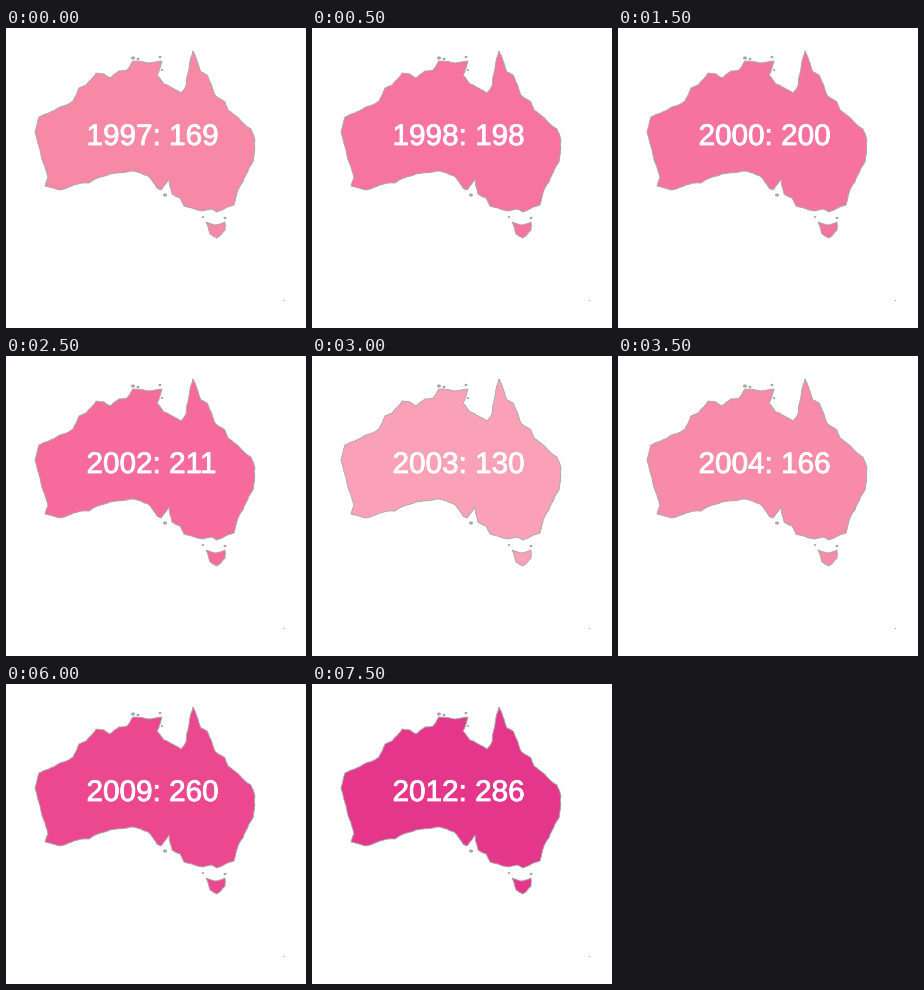
These frames come from a looping animation (300 px wide and 300 px high, 8 s). A matplotlib script:

```python
import numpy as np
import matplotlib.pyplot as plt
from matplotlib.animation import FuncAnimation
from matplotlib.colors import LinearSegmentedColormap, Normalize
from matplotlib.patches import Ellipse, Polygon
from matplotlib.patheffects import withStroke

SIZE, DPI = 300, 100
PT = 72 / DPI
GREY = "#a8a8a8"

FIRST_YEAR = 1997
COUNTS = [169, 198, 323, 200, 218, 211, 130, 166,
          225, 267, 266, 245, 260, 261, 281, 286]

pinks = LinearSegmentedColormap.from_list(
    "pinks", ["#fbaabe", "#f78aa8", "#f66599", "#ea418e", "#d71f87"])
scale = Normalize(115, 323, clip=True)

# Key points clockwise from the northern cape; rough() adds the coastal detail
MAINLAND = [
    (187, 23), (195, 44), (201, 47), (209, 67), (219, 74), (222, 82),
    (238, 96), (245, 101), (249, 112), (247, 134), (233, 160), (228, 177),
    (211, 184), (205, 181), (196, 183), (178, 178), (174, 170), (166, 166),
    (163, 151), (155, 162), (151, 160), (142, 148), (127, 143), (104, 146),
    (83, 155), (72, 156), (54, 162), (39, 158), (42, 150), (33, 119),
    (29, 104), (33, 89), (52, 80), (67, 73), (73, 60), (80, 57), (90, 45),
    (98, 46), (104, 50), (113, 43), (121, 42), (127, 33), (143, 35),
    (156, 33), (151, 47), (158, 56), (175, 65), (180, 58), (184, 33),
]
TASMANIA = [(200, 194), (209, 197), (219, 194), (219, 202), (211, 210), (204, 206)]

# Offshore islands: centre x, centre y, diameter
ISLANDS = [(127, 30, 4), (132, 31, 3), (154, 29, 3), (156, 42, 2.5),
           (159, 167, 4), (197, 189, 2.5), (219, 190, 3), (277.5, 272.5, 1.5)]

rng = np.random.default_rng(7)


def rough(points, rounds=3, amount=0.05):
    """Split each edge and nudge the midpoints for a ragged coast."""
    pts = np.array(points, float)
    for _ in range(rounds):
        edge = np.roll(pts, -1, axis=0) - pts
        normal = edge[:, ::-1] * (1, -1)
        shift = rng.uniform(-amount, amount, (len(pts), 1))
        pts = np.stack([pts, pts + edge / 2 + normal * shift], 1).reshape(-1, 2)
    return pts


fig = plt.figure(figsize=(SIZE / DPI, SIZE / DPI), dpi=DPI, facecolor="white")
ax = fig.add_axes([0, 0, 1, 1])
ax.set(xlim=(0, SIZE), ylim=(SIZE, 0))
ax.axis("off")

land = [ax.add_patch(Polygon(rough(shape), edgecolor=GREY, linewidth=0.9 * PT))
        for shape in (MAINLAND, TASMANIA)]
for x, y, d in ISLANDS:
    ax.add_patch(Ellipse((x, y), d, 0.8 * d, color=GREY, linewidth=0))

label = ax.text(80.5, 117, "", color="white", family="Liberation Sans",
                fontsize=29.7 * PT, ha="left", va="baseline",
                path_effects=[withStroke(linewidth=0.8 * PT, foreground="white")])


def draw(i):
    for patch in land:
        patch.set_facecolor(pinks(scale(COUNTS[i])))
    label.set_text(f"{FIRST_YEAR + i}: {COUNTS[i]}")
    return [*land, label]


anim = FuncAnimation(fig, draw, frames=len(COUNTS), interval=500, repeat=True)
plt.show()
```
